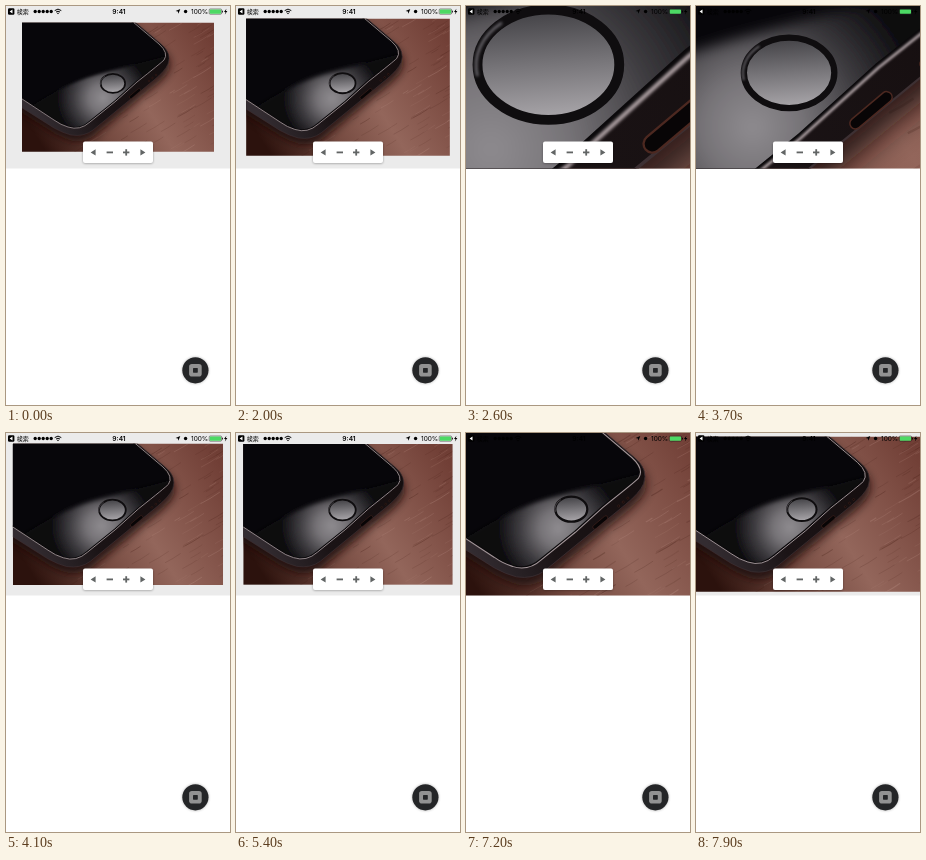
Animation, 224 px wide and 399 px high, one loop 8 s. Source, as an HTML page:

```html
<!DOCTYPE html>
<html lang="ja">
<head>
<meta charset="utf-8">
<title>Photo zoom</title>
<style>
  html, body { margin: 0; width: 100%; height: 100%; overflow: hidden; background: #fff; }
  svg { display: block; width: 100%; height: 100%; }
  text { font-family: Inter, "Noto Sans CJK JP", "Noto Sans CJK", Roboto, sans-serif; fill: #000; }
</style>
</head>
<body>
<svg viewBox="0 0 224 399" preserveAspectRatio="none">
  <defs>
    <clipPath id="stageClip"><rect width="224" height="162.5"/></clipPath>
    <clipPath id="photoClip"><rect x="16" y="16.8" width="192" height="129"/></clipPath>
    <clipPath id="glassClip"><use href="#glass"/></clipPath>
    <path id="body" d="M10 10H122L155 38Q166 47 162 58Q159 65 148 74L87 124Q78 131 65 129Q57 127 48 122L10 98Z"/>
    <path id="glass" d="M10 10H120L153 38Q163 47 158 54Q155 57 131 76L110 95L84 116Q74 125 62 121Q55 119 48 114L10 89Z"/>
    <linearGradient id="wood" gradientUnits="userSpaceOnUse" x1="40" y1="146" x2="208" y2="40">
      <stop offset="0" stop-color="#2c120d"/>
      <stop offset=".3" stop-color="#754a40"/>
      <stop offset=".55" stop-color="#93665b"/>
      <stop offset="1" stop-color="#713f36"/>
    </linearGradient>
    <linearGradient id="band" gradientUnits="userSpaceOnUse" x1="30" y1="110" x2="160" y2="50">
      <stop offset="0" stop-color="#332c31"/>
      <stop offset=".4" stop-color="#1b1416"/>
      <stop offset="1" stop-color="#150e0f"/>
    </linearGradient>
    <radialGradient id="sheen" gradientUnits="userSpaceOnUse" cx="97" cy="92" r="46">
      <stop offset="0" stop-color="#8f8c90"/>
      <stop offset=".3" stop-color="#767377"/>
      <stop offset=".65" stop-color="#3c3a3e"/>
      <stop offset="1" stop-color="#0e0d10"/>
    </radialGradient>
    <linearGradient id="key" x1=".45" y1="0" x2=".55" y2="1">
      <stop offset="0" stop-color="#424145"/>
      <stop offset=".5" stop-color="#777579"/>
      <stop offset="1" stop-color="#aaa7ab"/>
    </linearGradient>
    <filter id="soft" x="-20%" y="-20%" width="140%" height="140%"><feGaussianBlur stdDeviation="4"/></filter>
    <filter id="edge" x="-20%" y="-20%" width="140%" height="140%"><feGaussianBlur stdDeviation="1.8"/></filter>
    <filter id="fine"><feGaussianBlur stdDeviation=".25"/></filter>
    <filter id="drop" x="-20%" y="-40%" width="140%" height="180%"><feGaussianBlur stdDeviation="1.2"/></filter>
  </defs>

  <rect width="224" height="399" fill="#fff"/>
  <rect width="224" height="162.5" fill="#ebebeb"/>

  <g clip-path="url(#stageClip)">
    <g id="photo"><g clip-path="url(#photoClip)">
      <rect x="16" y="16" width="192" height="130" fill="url(#wood)"/>
      <g id="grain" fill="none"></g>
      <use href="#body" fill="#1d0a07" opacity=".85" transform="translate(1 6)" filter="url(#soft)"/>
      <use href="#body" fill="url(#band)" stroke="#3d3033" stroke-width=".6"/>
      <use href="#glass" fill="#07060a"/>
      <g clip-path="url(#glassClip)">
        <path d="M20 104Q58 78 90 69T165 49V80L70 135Z" fill="url(#sheen)" filter="url(#edge)"/>
        <use href="#glass" fill="none" stroke="#0b090b" stroke-width="2.6"/>
      </g>
      <use href="#glass" fill="none" stroke="#a39699" stroke-width=".8" filter="url(#fine)"/>
      <g fill="#080506" stroke="#4c2820" stroke-width=".4">
        <rect x="-7" y="-1.5" width="14" height="3" rx="1.5" transform="translate(129 87.5) rotate(-40)"/>
        <circle cx="143" cy="75" r=".8"/><circle cx="146.5" cy="72" r=".8"/><circle cx="150" cy="69" r=".8"/>
      </g>
      <g transform="translate(106.9 77.4)">
        <ellipse rx="12.2" ry="9.5" fill="url(#key)"/>
        <ellipse rx="12.2" ry="9.5" fill="none" stroke="#0f0d0f" stroke-width="1.7"/>
        <path d="M-12.2 2A12.2 9.5 0 0 1 -8 -7.2" fill="none" stroke="#77747a" stroke-width=".4" filter="url(#fine)"/>
      </g>
    </g></g>
  </g>

  <!-- status bar -->
  <rect x="2" y="2.2" width="6.4" height="6.6" rx="1.2"/>
  <path d="M6.5 3.5V7.5L3.6 5.5Z" fill="#fff"/>
  <text x="10.8" y="7.7" font-size="6">検索</text>
  <g id="signal"></g>
  <path d="M48.7 4.6Q52 1.6 55.3 4.6M50 6.1Q52 4.3 54 6.1" fill="none" stroke="#000"/>
  <path d="M50.9 7.1Q52 6.2 53.1 7.1L52 8.3Z"/>
  <text x="113" y="7.9" font-size="6.6" font-weight="600" text-anchor="middle">9:41</text>
  <path d="M174.3 3.1L172.4 7.8L171.9 5.6L169.6 5.1Z"/>
  <circle cx="179.6" cy="5.5" r="1.7"/>
  <text x="185" y="7.9" font-size="6.5">100%</text>
  <rect x="203.2" y="3" width="12.4" height="5.2" rx="1" fill="none" stroke="#222" stroke-width=".5"/>
  <rect x="203.8" y="3.5" width="11.2" height="4.2" rx=".6" fill="#4cd964"/>
  <rect x="216" y="4.7" width=".8" height="1.8"/>
  <path d="M220.4 2.8L218 6H219.5L218.9 8.5L221.4 5H219.9Z"/>

  <!-- toolbar -->
  <rect x="77" y="136.4" width="70" height="21" rx="2" opacity=".35" filter="url(#drop)"/>
  <rect x="77" y="135.6" width="70" height="21.3" rx="2" fill="#fff"/>
  <g fill="#626565">
    <path d="M84.6 146.4L89.6 143.2V149.6ZM139.4 146.4L134.4 143.2V149.6Z"/>
    <rect x="100.6" y="145.5" width="6.4" height="1.8"/>
    <rect x="117" y="145.5" width="6.4" height="1.8"/>
    <rect x="119.3" y="143.2" width="1.8" height="6.4"/>
  </g>

  <!-- floating button -->
  <circle cx="189.4" cy="364.3" r="13.6" fill="#999" opacity=".5" filter="url(#drop)"/>
  <circle cx="189.4" cy="364.3" r="13.1" fill="#242527"/>
  <rect x="183.1" y="358" width="12.6" height="12.6" rx="2.8" fill="#929292"/>
  <rect x="187" y="361.9" width="4.8" height="4.8" rx=".6" fill="#242527"/>
</svg>
<script>
  const LOOP = 8000, TICK = 100, CX = 112, CY = 81.3;
  // start, end, scale before, scale after
  const moves = [
    [1919, 2659, 1, 6],
    [3440, 4204, 6, 1],
    [5020, 6160, 1, 1.4],
    [6550, 8000, 1.4, 1.2]
  ];
  const photo = document.getElementById('photo');
  const clamp = v => Math.min(1, Math.max(0, v));
  const smooth = u => u * u * (3 - 2 * u);

  function add(parent, tag, attrs) {
    const el = document.createElementNS('http://www.w3.org/2000/svg', tag);
    for (const name in attrs) el.setAttribute(name, attrs[name]);
    document.getElementById(parent).append(el);
  }

  let seed = 17;
  const random = () => (seed = seed * 16807 % 2147483647) / 2147483647;

  for (let i = 0; i < 5; i++) add('signal', 'circle', { cx: 29.2 + i * 4, cy: 5.5, r: 1.65 });

  // wood grain
  for (let i = 0; i < 140; i++) {
    const x = 50 + random() * 160, y = 15 + random() * 135, len = 5 + random() * 14;
    add('grain', 'path', {
      d: `M${x} ${y}q${len * .5} ${-len * .25} ${len} ${-len * .6}`,
      stroke: random() < .6 ? '#3c170f' : '#c29a8f',
      'stroke-width': .4 + random() * .5,
      opacity: .1 + random() * .18
    });
  }

  function scaleAt(t) {
    let scale = 1;
    for (const [start, end, from, to] of moves)
      if (t >= start) scale = from * (to / from) ** smooth(clamp((t - start) / (end - start)));
    return scale;
  }

  function draw(now) {
    const t = Math.floor(now % LOOP / TICK) * TICK;
    photo.setAttribute('transform', `translate(${CX} ${CY}) scale(${scaleAt(t)}) translate(${-CX} ${-CY})`);
    requestAnimationFrame(draw);
  }
  draw(performance.now());
</script>
</body>
</html>
```
